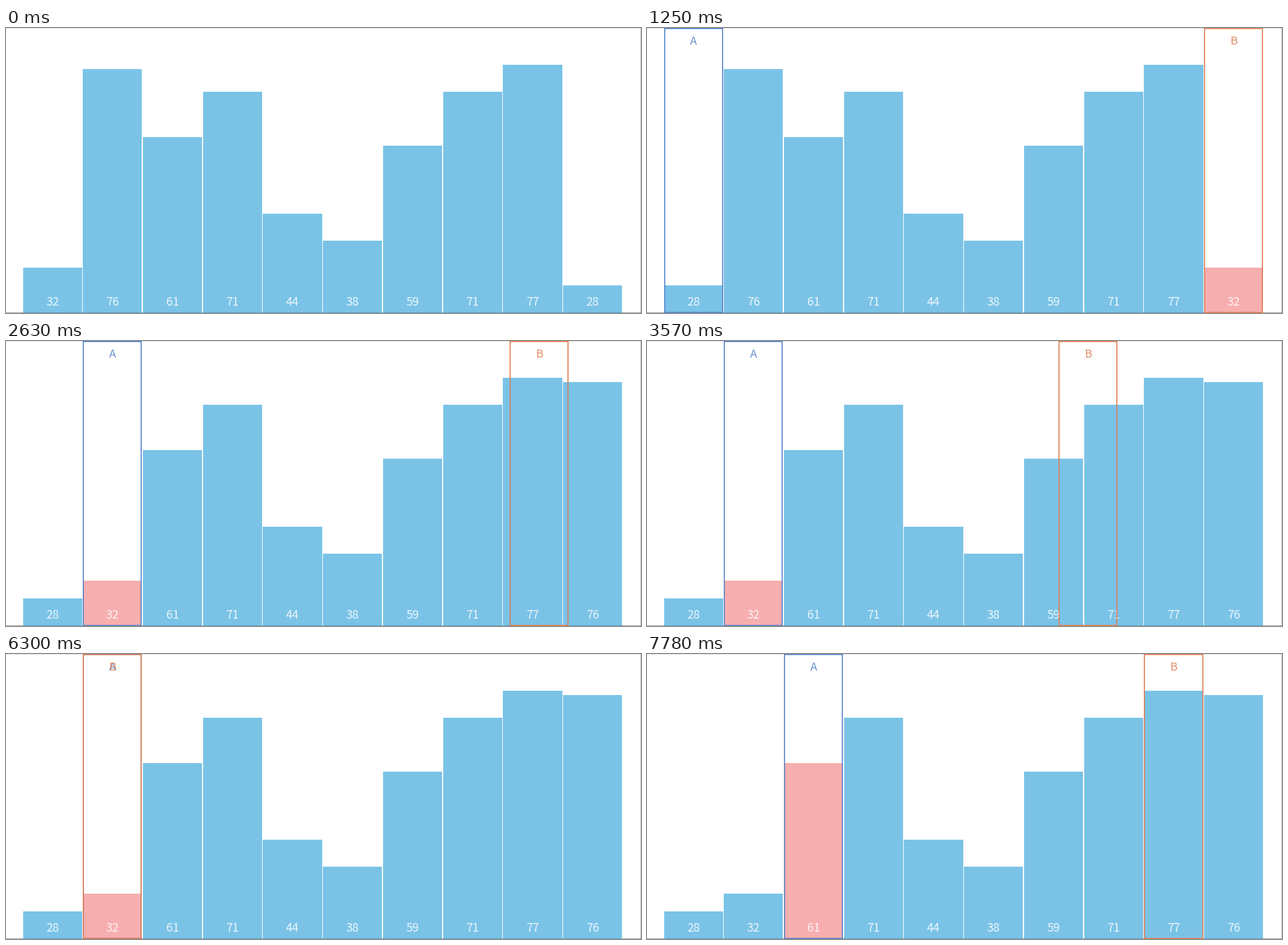
A matplotlib script that plays this animation: 1034 px wide and 465 px high, repeating every 8000 ms.

```python
import math
from itertools import takewhile

import matplotlib.pyplot as plt
from matplotlib.animation import FuncAnimation
from matplotlib.patches import Rectangle

W, H, DPI = 1034, 465, 100
LOOP, INTERVAL = 8000, 20
LEFT, PITCH, BAR_W = 27.6, 97.716, 96.18
STROKE = 1.7
BLUE, PINK = (44 / 255, 160 / 255, 218 / 255, 0.63), "#f7aeaf"
FONT = dict(family="Noto Sans CJK JP", weight="light", ha="center", va="baseline")

# Motion is refreshed once per tick; sort steps and easing are timed in ticks.
TICK, FIRST_TICK = 77.9, 54
STEP_TICKS, STEP_OFFSET, MOVE_TICKS = 6.495, -0.935, 2.8

VALUES = [32, 76, 61, 71, 44, 38, 59, 71, 77, 28]


def quicksort(order, lo, hi):
    """Yield (pivot bar, {moved item: new slot}) for each step of the sort."""
    if lo >= hi:
        return
    pivot, a, b = order[lo], lo, hi

    def swap():
        order[a], order[b] = order[b], order[a]
        return pivot, {order[a]: a, order[b]: b}

    yield pivot, {"A": a}
    yield pivot, {"B": b}
    while a < b:
        while a < b and VALUES[order[b]] >= VALUES[pivot]:
            b -= 1
            yield pivot, {"B": b}
        if a < b:
            yield swap()
        while a < b and VALUES[order[a]] <= VALUES[pivot]:
            a += 1
            yield pivot, {"A": a}
        if a < b:
            yield swap()
    yield from quicksort(order, lo, a - 1)
    yield from quicksort(order, a + 1, hi)


STEPS = list(quicksort(list(range(len(VALUES))), 0, len(VALUES) - 1))


def ease_out(t):
    return 1 - (1 - min(t, 1)) ** 3


def state_at(now):
    """Slots of all bars and markers, and the pivot bar."""
    tick = math.floor((now - FIRST_TICK) / TICK)
    slots = {i: i for i in range(len(VALUES))} | {"A": -1, "B": -1}
    pivot = None
    times = ((tick - STEP_OFFSET - STEP_TICKS * k) / MOVE_TICKS for k in range(len(STEPS)))
    for t, (pivot, targets) in zip(takewhile(lambda t: tick >= 0 and t > 0, times), STEPS):
        for item, target in targets.items():
            slots[item] += (target - slots[item]) * ease_out(t)
    return slots, pivot


fig = plt.figure(figsize=(W / DPI, H / DPI), dpi=DPI, facecolor="white")
ax = fig.add_axes([0, 0, 1, 1])
ax.set(xlim=(0, W), ylim=(H, 0))
ax.axis("off")


def add_text(text, y, color, size, z):
    return ax.text(0, y, text, color=color, alpha=0.85, fontsize=size * 72 / DPI,
                   zorder=z, **FONT)


def add_bar(index, value):
    top = round(420.3 - 7.355 * (value - 28))
    rect = Rectangle((0, top), 1, H - top, lw=0, zorder=index)
    ax.add_patch(rect)
    return rect, add_text(str(value), 453, "white", 19, index + 0.5)


def add_marker(label, color, z):
    rect = Rectangle((0, STROKE / 2), 1, H - STROKE, fill=False, ec=color,
                     lw=STROKE * 72 / DPI, joinstyle="miter", snap=False, zorder=z)
    ax.add_patch(rect)
    return rect, add_text(label, 27, color, 18.5, z)


def add_border(x, y, w, h, alpha):
    ax.add_patch(Rectangle((x, y), w, h, fc=(0, 0, 0, alpha), lw=0, zorder=-1))


add_border(0, 0, W, 1, 0.12)
add_border(W - 1, 0, 1, H, 0.25)
add_border(0, H - 1, W, 1, 0.4)
bars = [add_bar(i, v) for i, v in enumerate(VALUES)]
markers = {"A": add_marker("A", "#5482c8", 30), "B": add_marker("B", "#e07d50", 31)}


def place(rect, text, slot, inset=0):
    x = LEFT + PITCH * slot
    left, right = round(x), round(x + BAR_W)
    rect.set_x(left + inset)
    rect.set_width(right - left - 2 * inset)
    text.set_x(x + BAR_W / 2)


def draw(frame):
    slots, pivot = state_at(frame * INTERVAL + INTERVAL // 2)
    for i, (rect, text) in enumerate(bars):
        place(rect, text, slots[i])
        rect.set_facecolor(PINK if i == pivot else BLUE)
    for name, (rect, text) in markers.items():
        place(rect, text, slots[name], STROKE / 2)
        for artist in (rect, text):
            artist.set_visible(slots[name] > -1)
    return []


anim = FuncAnimation(fig, draw, frames=LOOP // INTERVAL, interval=INTERVAL,
                     repeat=True, repeat_delay=0, blit=False)
plt.show()
```
